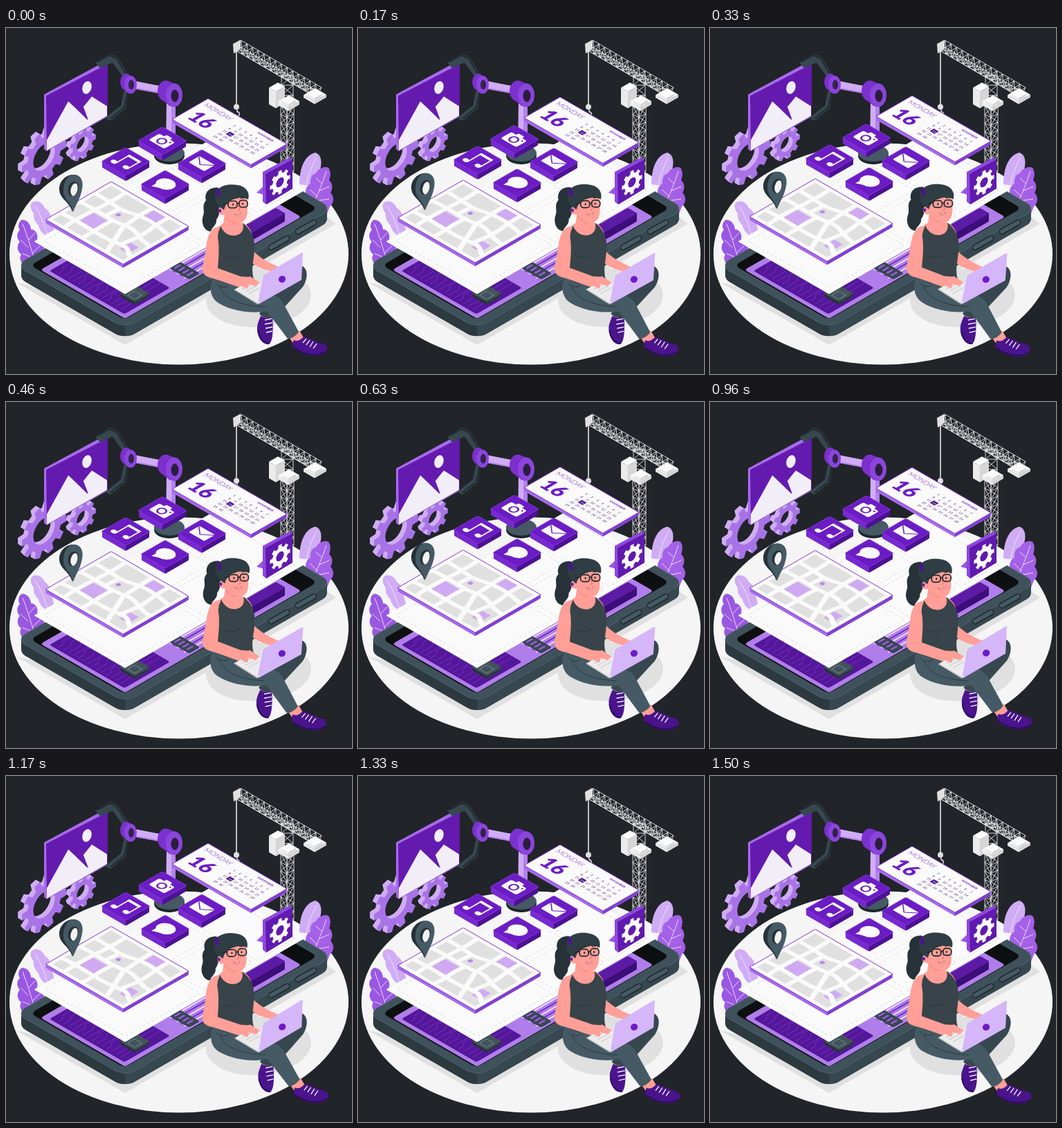
Animation of 500 by 500 pixels, one loop 1540 ms. Source, as an HTML page with a canvas:

```html
<!DOCTYPE html>
<html lang="en">
<head>
<meta charset="utf-8">
<title>App development</title>
<style>
html, body { margin: 0; height: 100%; overflow: hidden; background: #212429; }
canvas { display: block; width: 100vw; height: 100vh; }
</style>
</head>
<body>
<canvas id="stage"></canvas>
<script>
const LOOP = 1540;
const canvas = document.getElementById('stage');
const ctx = canvas.getContext('2d');
const scale = window.devicePixelRatio || 1;
canvas.width = canvas.height = 500 * scale;

const DARK = '#263238', SLATE = '#37474f', STEEL = '#455a64', WHITE = '#fafafa';
const PURPLE = '#6c1cc4', DEEP = '#4c1292', MID = '#8b45dc', SOFT = '#a569ea', PALE = '#d0acf5';
const SKIN = '#ff9f97';

function paint(path, fill, line, width = 1) {
  if (fill) { ctx.fillStyle = fill; ctx.fill(path); }
  if (line) { ctx.strokeStyle = line; ctx.lineWidth = width; ctx.stroke(path); }
}
const shape = (d, fill, line, width) => paint(new Path2D(d), fill, line, width);
const stroke = (d, line, width = 1) => shape(d, null, line, width);

function oval(x, y, rx, ry, fill, tilt = 0) {
  const p = new Path2D();
  p.ellipse(x, y, rx, ry, tilt, 0, 2 * Math.PI);
  paint(p, fill);
}

function group(draw, ...matrix) {
  ctx.save();
  ctx.transform(...matrix);
  draw();
  ctx.restore();
}
const floor = (x, y, draw) => group(draw, .866, .5, -.866, .5, x, y);
const wall = (x, y, draw) => group(draw, .866, -.5, 0, 1, x, y);
const shifted = (x, y, draw) => group(draw, 1, 0, 0, 1, x, y);

function rotated(x, y, degrees, draw) {
  ctx.save();
  ctx.translate(x, y);
  ctx.rotate(degrees * Math.PI / 180);
  ctx.translate(-x, -y);
  draw();
  ctx.restore();
}

function box(x, y, w, h, fill, r = 0, line, width) {
  const p = new Path2D();
  p.roundRect(x, y, w, h, r);
  paint(p, fill, line, width);
}

// Flat slab lying on the floor plane; (x, y) is its far corner.
function slab(x, y, w, h, depth, r, top, left, right, edge) {
  const split = x + .866 * (w - h);
  const side = ctx.createLinearGradient(split - .5, 0, split + .5, 0);
  side.addColorStop(0, left);
  side.addColorStop(1, right);
  const face = new Path2D();
  face.roundRect(0, 0, w, h, r);
  for (let d = depth; d > 0; d -= .5) {
    const p = new Path2D();
    p.addPath(face, new DOMMatrix([.866, .5, -.866, .5, x, y + d]));
    paint(p, side);
  }
  floor(x, y, () => paint(face, top, edge, 1));
}

function gear(r, teeth, hole, fill) {
  const p = new Path2D();
  const step = 2 * Math.PI / teeth;
  for (let i = 0; i < teeth; i++) {
    [[-.3, .76], [-.2, 1], [.2, 1], [.3, .76]].forEach(([a, k]) => {
      const angle = (i + a) * step;
      p.lineTo(r * k * Math.cos(angle), r * k * Math.sin(angle));
    });
  }
  p.closePath();
  p.moveTo(hole, 0);
  p.arc(0, 0, hole, 0, 2 * Math.PI);
  ctx.fillStyle = fill;
  ctx.fill(p, 'evenodd');
}

function thickGear(x, y, r, teeth, hole) {
  for (let d = 6; d > 0; d -= .5) wall(x - d, y - d * .58, () => gear(r, teeth, hole, PALE));
  wall(x, y, () => gear(r, teeth, hole, '#a873e6'));
}

function lattice(x1, y1, x2, y2, dx, dy, cells) {
  const p = new Path2D();
  const at = (i, side) => [x1 + (x2 - x1) * i / cells + dx * side, y1 + (y2 - y1) * i / cells + dy * side];
  for (const side of [0, 1]) {
    p.moveTo(...at(0, side));
    p.lineTo(...at(cells, side));
    for (let i = 0; i < cells; i++) {
      p.moveTo(...at(i, side));
      p.lineTo(...at(i + 1, 1 - side));
    }
  }
  for (let i = 0; i <= cells; i++) {
    p.moveTo(...at(i, 0));
    p.lineTo(...at(i, 1));
  }
  paint(p, null, '#e6e6e6', .9);
}

function block(x, y, a, b, h) {
  shape(`M${x - a} ${y - a * .577}L${x} ${y}V${y + h}L${x - a} ${y + h - a * .577}Z`, '#ebebeb');
  shape(`M${x + b} ${y - b * .577}L${x} ${y}V${y + h}L${x + b} ${y + h - b * .577}Z`, '#d6d6d6');
  shape(`M${x - a} ${y - a * .577}L${x} ${y}L${x + b} ${y - b * .577}L${x + b - a} ${y - (a + b) * .577}Z`, WHITE);
}

function crane() {
  lattice(397, 112, 397, 212, 9, 5, 8);
  lattice(406, 117, 406, 212, 10, -5, 8);
  lattice(398, 68, 398, 112, 17, 0, 3);
  lattice(340, 18, 456, 86, -7, 15, 14);
  lattice(333, 33, 446, 98, 5, -6, 14);
  shape('M328 23L339 17V30L329 37Z', '#e0e0e0');
  stroke('M333 34V111', '#e6e6e6', 1.6);
  oval(333, 114, 4, 4, '#e0e0e0');
  stroke('M334 118V121C339 122 338 128 334 127L332 125', '#e6e6e6', 1.4);
  block(390, 92, 10, 13, 24);
  block(408, 115, 15, 16, 5);
  block(408, 110, 10, 11, 4);
  block(446, 106, 16, 17, 4);
  block(446, 101, 10, 11, 4);
}

function leaf(d, fill, veins) {
  shape(d, fill);
  stroke(veins, '#f1e6fc', .9);
}

function plants() {
  leaf('M64 303C54 300 48 292 47 285C41 280 39 272 40 268C35 262 35 256 37 253C43 247 53 252 56 260C63 264 66 272 66 280L70 294Z',
    PALE, 'M42 257C50 270 56 284 60 300');
  leaf('M32 345C22 342 18 334 22 327C16 323 15 314 20 309C15 304 15 296 20 292C16 286 19 278 24 277C32 278 36 285 36 291C43 291 47 299 45 305C53 307 57 316 54 324L56 340Z',
    '#9a58e2', 'M24 283C31 300 36 318 42 338M33 306L42 296M32 317L21 306M38 325L49 315M36 331L24 326');
  leaf('M424 226C424 203 431 184 447 180C459 184 459 204 442 228Z', PALE, 'M449 187C441 201 437 212 434 228');
  leaf('M434 243C431 234 435 227 440 225C439 216 443 211 448 210C451 203 460 199 466 202C470 208 469 215 467 220C473 225 472 233 469 238C475 244 474 253 468 258L464 268L440 256Z',
    '#a461e7', 'M463 207C458 222 452 237 445 253M457 225L448 217M453 235L467 229M450 244L439 233M448 250L467 247');
}

function picture() {
  thickGear(55, 186, 37, 10, 18);
  thickGear(111, 168, 22, 9, 10);
  shape('M55 96L142 49L147 52V128L59 178L55 175Z', '#a66be9');
  shape('M58 98L147 52V127L59 177Z', '#641aaf');
  shape('M59 177V162L90 106L106 121L118 133L111 115L124 99L146 113V127Z', '#f2eef8');
  shape('M103 118L111 112L119 133Z', '#641aaf');
  oval(117, 86, 6.5, 9.5, '#f2eef8', .3);
}

function robot() {
  oval(236, 185, 22, 12, '#1d262b');
  oval(236, 181, 22, 12, STEEL);
  shape('M232 108H245V171H231Z', PALE);
  shape('M239 108H245V171H239Z', '#b483ee');
  shape('M183 76L229 85V95L183 87Z', PALE);
  stroke('M185 87L229 95', '#b483ee', 2);
  shape('M129 50L150 37L161 42L177 68L171 74L154 50L136 58Z', SLATE);
  stroke('M131 49L150 39L160 44L174 67', '#20292e', 2);
  shape('M171 88L177 91L173 116L151 134L143 130L166 112Z', SLATE);
  stroke('M176 92L171 115L151 131', '#20292e', 2);
  oval(174, 78, 9, 12, '#7c31cf');
  oval(180, 82, 9, 13, MID);
  oval(181, 82, 4, 7, '#35224f');
  oval(231, 91, 12, 15, '#7c31cf');
  shape('M226 77L241 79L249 112L237 113L222 101Z', '#7c31cf');
  oval(243, 97, 12, 17, MID);
  oval(244, 98, 5.5, 9, '#2b1d3d');
}

function phone() {
  slab(314, 170, 182, 346, 16, 16, '#3f525b', '#2c393f', SLATE, '#4d626c');
  floor(314, 170, () => {
    box(12, 12, 157, 322, '#0d0f11', 8);
    box(27, 38, 141, 294, '#b07eea', 4);
    box(36, 250, 125, 76, '#54179a', 3);
    for (let i = 0; i < 14; i++) {
      const u = 42 + i * 8, v = 310 - (i * 7) % 23;
      stroke(`M${u} 252V${v}l5 5V322`, '#7832c4', .8);
    }
    for (let i = 0; i < 5; i++) stroke(`M${135 + i * 6} 120V224`, i % 2 ? '#6c2abb' : '#f3e9fd', 2);
    box(131, 204, 34, 18, SLATE, 3);
    for (let i = 0; i < 4; i++) box(135 + i * 7, 208, 3, 10, '#9a5be0');
  });
  slab(390, 260, 16, 57, 11, 2, '#5b1ba4', '#4a128c', '#3d0d78');
  slab(186, 371, 25, 25, 4, 2, '#42535b', DARK, '#2b383e');
  floor(186, 376, () => box(4, 4, 12, 12, null, 1, '#72838b', 1.2));
  ctx.lineCap = 'round';
  stroke('M383 317L406 304M422 294L445 281', '#20292e', 9);
  stroke('M383 317L406 304M422 294L445 281', STEEL, 6);
  ctx.lineCap = 'butt';
}

function sheet() {
  floor(301, 158, () => {
    box(0, 0, 152, 301, WHITE, 1);
    ctx.setLineDash([4, 3]);
    [[8, 8, 136, 65], [8, 80, 64, 80], [80, 80, 64, 80], [8, 168, 136, 124]]
      .forEach(([x, y, w, h]) => box(x, y, w, h, null, 2, '#dcdcdc', .9));
    ctx.setLineDash([]);
  });
}

function label(text, x, y, font, color = PURPLE, align = 'left') {
  ctx.font = font + ' Lato, sans-serif';
  ctx.textAlign = align;
  ctx.fillStyle = color;
  ctx.fillText(text, x, y);
}

function calendar() {
  slab(292, 102, 131.5, 60, 5, 1, WHITE, SOFT, '#8240d0', '#7d32cf');
  floor(292, 102, () => {
    label('MONDAY', 6, 14, '300 10px');
    label('16', 9, 46, '900 29px');
    label('NOVEMBER', 116, 9, 'bold 4.5px', PURPLE, 'right');
    box(66, 29.5, 8, 7, '#4c1292');
    for (let day = 1; day <= 30; day++) {
      const col = (day - 1) % 7, row = Math.floor((day - 1) / 7);
      label(day, 61.5 + col * 9, 19 + row * 8, '5px', day === 16 ? WHITE : '#512080', 'center');
    }
  });
}

function cityMap() {
  slab(152, 222, 129.5, 109.5, 5, 1, WHITE, SOFT, '#8240d0', '#7d32cf');
  floor(152, 222, () => {
    box(6, 6, 117.5, 97.5, '#e0e0e0');
    box(30, 60, 24, 24, '#cfaaf2');
    box(77, 6, 20, 20, '#cfaaf2');
    box(104, 72, 14, 18, '#cfaaf2');
    ctx.save();
    ctx.beginPath();
    ctx.rect(1, 1, 127, 107);
    ctx.clip();
    stroke('M0 31C28 28 43 36 62 29S105 24 130 31M0 56C30 51 55 58 74 52S108 64 130 60' +
      'M0 88C30 82 67 90 92 84S112 91 130 94M27 0C33 30 21 75 28 110M58 55C53 75 61 90 56 110' +
      'M73 0C70 25 76 38 74 53L100 110M101 0C96 20 106 42 102 62L98 84M46 32L44 56', WHITE, 6.5);
    ctx.restore();
    oval(54, 42, 3, 3, '#b985ee');
  });
}

function pin() {
  const hole = 'M96 243C90 243 88 235 91 228C94 221 102 220 104 226C106 233 102 242 96 243Z';
  shape('M96 265.5C91 250 77 247 77 233C77 220 88 211 98 212C109 213 112 224 108 237C105 249 100 255 96 265.5Z', DARK);
  shape('M97 266C94 252 83 248 83 235C83 223 89 211 99 212C110 213 113 224 109 237C106 249 101 255 97 266Z', STEEL);
  shape(hole, DARK);
  shape('M97 243C93 241 92 235 95 229C97 224 102 223 103 227C105 234 101 242 97 243Z', '#f2f2f2');
}

const icons = {
  music() {
    stroke('M-6 10V-12L12 -12V8', WHITE, 2);
    stroke('M-7 -11H13', WHITE, 4);
    oval(-9.5, 10, 4.4, 3.6, WHITE);
    oval(8.5, 8, 4.4, 3.6, WHITE);
  },
  camera() {
    box(-13, -8, 26, 18, WHITE, 3);
    box(-5, -12, 10, 6, WHITE, 2);
    oval(0, 1, 6.6, 6.6, PURPLE);
    oval(0, 1, 4.3, 4.3, WHITE);
    oval(9, -4, 1.3, 1.3, PURPLE);
  },
  mail() {
    box(-13, -9, 26, 18, WHITE, 1.5);
    stroke('M-13 -8L0 3L13 -8', PURPLE, 1.3);
  },
  chat() {
    oval(0, -1, 12.5, 11, WHITE);
    shape('M-9 4L-9 14L2 9Z', WHITE);
  }
};

function tile(x, y, icon) {
  slab(x, y - 20.2, 40.4, 40.4, 8, 2, PURPLE, '#7729cf', DEEP, '#8139d6');
  floor(x, y, icon);
}

function settings() {
  shape('M362 238L376 225V242Z', '#9a57e3');
  shape('M371 208L410 187L414 190V232L376 255L371 251Z', '#8f48df');
  shape('M375 211L414 190V232L376 255Z', '#611aae');
  wall(396, 223, () => gear(17, 8, 6.5, WHITE));
}

function legs() {
  shape('M369 411L384 413L383 425H370Z', SKIN);
  shape('M368 416C375 420 380 419 385 417C386 430 387 452 380 457C370 458 363 446 363 434C363 427 366 422 368 416Z', '#4a148c');
  stroke('M364 437C366 450 374 456 381 456', '#2b0a58', 1.6);
  stroke('M374 422L384 420M374 428L385 426M375 434L385 432M376 440L385 438', WHITE, 1.3);
  shape('M364 383C390 371 410 346 426 343C438 347 436 363 429 374L389 418C379 421 370 418 366 413L384 383Z', SLATE);
  shape('M409 447L424 437L431 449L416 457Z', SKIN);
  shape('M416 451C423 454 427 449 430 446C440 448 449 455 461 457C467 462 464 469 457 472C443 477 424 470 416 463C413 459 414 455 416 451Z', '#4a148c');
  stroke('M416 462C430 472 448 476 462 468', '#2b0a58', 1.7);
  stroke('M429 455L434 449M434 458L439 451M439 461L444 453M444 463L449 456', WHITE, 1.3);
  shape('M299 359C293 376 295 390 308 398C328 410 358 413 377 409L407 449C413 449 420 444 423 439L402 400C395 386 382 384 366 382L352 364Z', STEEL);
  stroke('M309 373C314 391 337 401 374 403M303 369C308 375 316 376 322 373', DARK, .8);
}

function body() {
  shape('M307 231C293 229 286 239 289 249C282 257 288 264 285 271C281 282 287 294 296 294C297 288 305 285 304 277C311 268 309 255 310 246Z', DARK);
  shape('M316 268L314 282C311 285 306 287 304 291L306 309L350 312C356 300 353 286 343 282L333 280L332 272Z', SKIN);
  shape('M344 284C354 288 358 297 357 322C371 336 385 341 394 345L390 352C375 351 361 345 353 337Z', SKIN);
  shape('M310 286C309 293 303 298 303 309C306 327 306 344 302 361C316 374 345 373 358 363C353 346 360 331 359 312C358 299 352 289 342 282C345 291 340 300 329 300C319 300 313 293 310 286Z', '#384449');
  stroke('M314 329C322 334 332 333 338 328', DARK, .8);
  shape('M308 287C296 288 291 299 289 319L284 346C283 356 289 360 300 362L338 375C347 378 355 376 365 374L367 368L354 360L339 359L306 347C307 334 309 318 306 302Z', SKIN);
}

function head() {
  shape('M313 251C320 241 341 239 348 247L349 261C350 275 343 283 334 282C327 281 319 277 316 270C308 272 304 264 309 259Z', SKIN);
  stroke('M317 272C321 278 327 281 333 282', '#e98279', .9);
  shape('M302 243C302 229 320 224 335 227C347 229 353 238 350 248C343 243 333 246 327 248C321 250 317 255 315 263L311 260C306 257 302 252 302 243Z', '#2f3d44');
  shape('M304 230C309 233 311 238 309 244L304 243Z', '#4a148c');
  oval(309, 264, 2.2, 2.5, '#6318ae');
  box(321, 250, 13, 10, null, 4, '#20272b', 1.7);
  box(337, 249, 12, 10, null, 4, '#20272b', 1.7);
  stroke('M314 255L321 253M334 254L337 253', '#20272b', 1.6);
  oval(328, 255, 1.2, 1.6, DARK);
  oval(342, 254, 1.2, 1.6, DARK);
  stroke('M324 248L331 246M339 246L345 245', DARK, 1.3);
  stroke('M336 257L338 263L335 264', '#d56f70', .9);
  shape('M330 268C333 271 337 270 339 267C339 272 333 273 330 268Z', '#fff', '#b94d57', .7);
}

function laptop() {
  shape('M330 378L357 363L374 373L365 399Z', '#ececec');
  stroke('M330 378L364 399', '#bdbdbd', 1.4);
  stroke('M341 378L358 369M346 381L363 372M351 384L367 375', '#c8c8c8', 1);
  shape('M337 363L353 359L366 368L361 373L351 370L349 377L338 372Z', SKIN);
  shape('M371 358L427 325C429 324 430 326 429 328L427 364L367 398C365 399 364 397 364 395Z', '#d5b6f8');
  stroke('M371 358L364 395L367 398', '#f3e8fd', 1);
  oval(399, 363, 5.2, 4.8, PURPLE, -.5);
}

// Linear triangle wave: 0 at t = 0, 1 at a quarter, -1 at three quarters.
const triangle = t => 1 - 4 * Math.abs((t + .75) % 1 - .5) === 0 ? 0 : 4 * Math.abs((t + .75) % 1 - .5) - 1;

function draw(time) {
  const t = (time % LOOP) / LOOP;
  const lift = -10 * (1 - Math.abs(1 - 2 * t));

  ctx.setTransform(scale, 0, 0, scale, 0, 0);
  ctx.lineJoin = 'round';
  ctx.fillStyle = '#212429';
  ctx.fillRect(0, 0, 500, 500);
  oval(250, 326.5, 245, 160, '#f5f5f5');
  // Contact shadows under the phone and the figure.
  shape('M15 368L172 458L477 283L440 255L170 400Z', '#e0e0e0');
  oval(365, 390, 76, 42, '#e0e0e0', -.08);

  crane();
  plants();
  picture();
  phone();
  sheet();
  robot();

  shifted(0, lift, () => {
    calendar();
    cityMap();
    pin();
    tile(226, 163, icons.camera);
    tile(173, 193, icons.music);
    tile(283, 196, icons.mail);
    tile(230, 226, icons.chat);
  });
  settings();

  rotated(374, 350, triangle(t), () => {
    legs();
    body();
    head();
    laptop();
  });
}

function frame() {
  draw(performance.now());
  requestAnimationFrame(frame);
}
frame();
</script>
</body>
</html>
```
